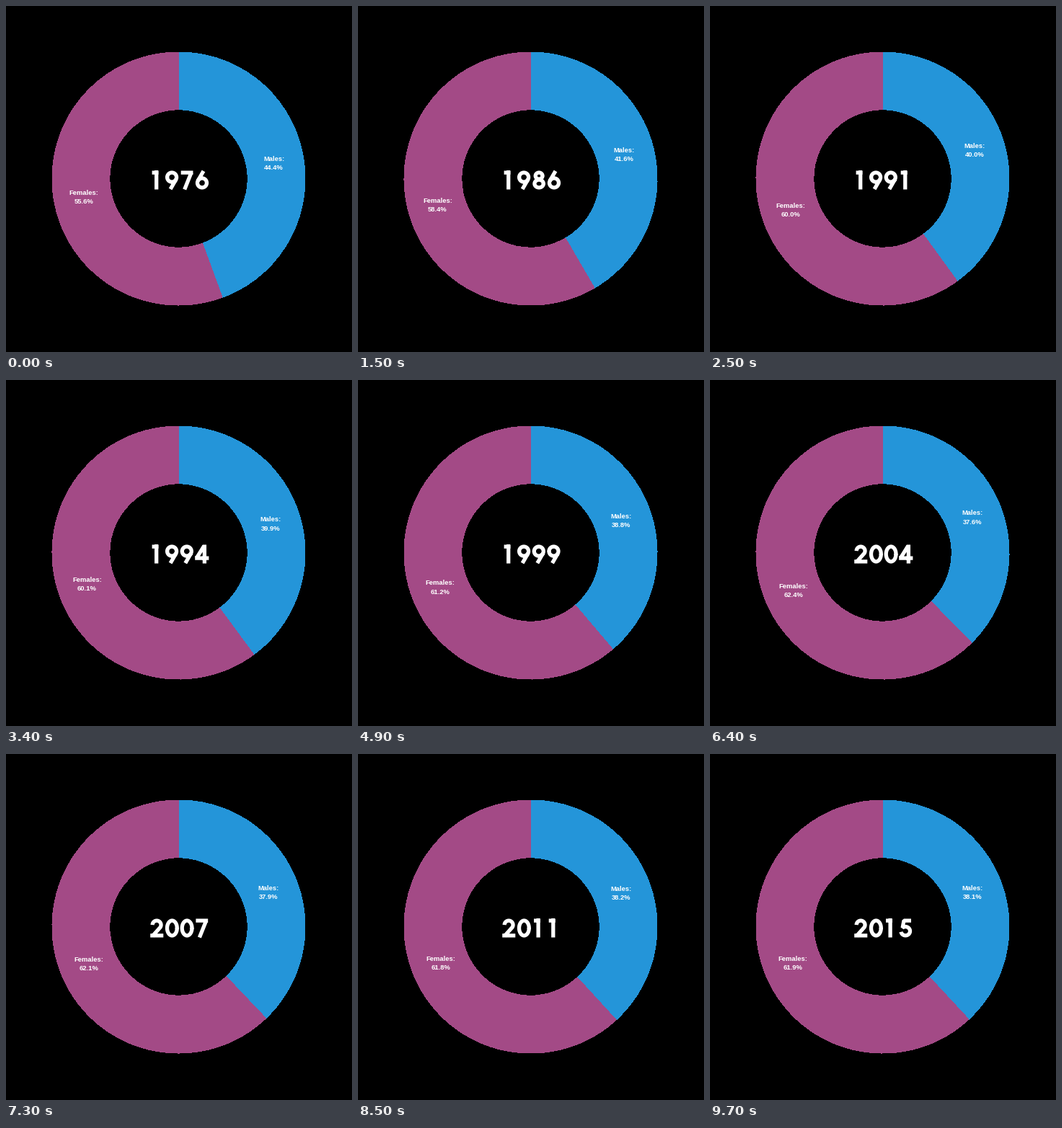
A matplotlib script for the animation above (10000 ms loop, 480 px wide and 480 px high).

```python
import numpy as np
import matplotlib.pyplot as plt
from matplotlib.animation import FuncAnimation
from matplotlib.patches import PathPatch, Wedge
from matplotlib.path import Path

SIZE, DPI, TICK = 480, 100, 100
PT = 72 / DPI
BLUE, PURPLE = "#2495d9", "#a34a86"
CENTER, OUTER, INNER = 239.5, 175.5, 95.7
LABEL_R, LABEL_X, LABEL_Y = 134, 239.7, 241.4

# Digit cell: advance, height and stroke width in pixels
ADVANCE, HEIGHT, STROKE = 20.7, 26, 5.3
YEAR_X, YEAR_Y = 199.3, 228.5

# Share of males at the turning points of the curve
KEY_YEARS = [1976, 1980, 1984, 1986, 1990, 1992, 1994, 1999, 2004, 2011, 2015]
KEY_SHARES = [44.4, 42.8, 42.5, 41.6, 39.7, 40.2, 39.9, 38.8, 37.6, 38.2, 38.1]

# Every second year at first (1978 is skipped), then every year
years = [1976, *range(1980, 1990, 2), *range(1990, 2016)]
schedule = [y for y in years for _ in range(4 if 1980 <= y <= 1986 else 3)]

fig = plt.figure(figsize=(SIZE / DPI, SIZE / DPI), dpi=DPI, facecolor="black")
ax = fig.add_axes([0, 0, 1, 1])
ax.set(xlim=(0, SIZE), ylim=(SIZE, 0))
ax.axis("off")


def arc(x, y, rx, ry=None, start=0, end=365):
    """Points along an ellipse, clockwise on screen from the right."""
    a = np.radians(np.linspace(start, end, 60))
    return np.column_stack([x + rx * np.cos(a), y + (ry or rx) * np.sin(a)])


def line(*points):
    return np.array(points, float)


def make_digits():
    """Strokes of the geometric bold numerals, y pointing down."""
    bar = STROKE / 2
    foot = HEIGHT - bar
    six = [arc(10.6, 16.9, 6.5), line((4.97, 13.65), (12.6, 0.45))]
    return {
        "0": [arc(10.4, 13, 6.9, 10.4)],
        "1": [line((3.3, bar), (12, bar)), line((9.4, 0), (9.4, HEIGHT))],
        "2": [np.vstack([arc(9.8, 8.6, 5.95, start=180, end=395), (4.0, 24)]),
              line((0.9, foot), (19, foot))],
        "3": [arc(10, 7.4, 4.75, start=190, end=450),
              arc(10, 18, 6.3, 5.4, start=270, end=530)],
        "4": [line((14, 0), (14, HEIGHT)), line((13.2, 2), (3, 18.4)),
              line((0.8, 18.6), (20, 18.6))],
        "5": [np.vstack([line((17.6, bar), (7.6, bar)),
                         arc(9.8, 17.2, 6.3, 6.1, start=230, end=530)])],
        "6": six,
        "7": [line((2, bar), (18.8, bar)), line((16.2, 3), (7, HEIGHT))],
        "8": [arc(10.4, 7.1, 4.9, 4.5), arc(10.4, 18, 6.2, 5.4)],
        "9": [(ADVANCE, HEIGHT) - s for s in six],
    }


DIGITS = make_digits()


def year_path(year):
    strokes = [Path(s + (YEAR_X + i * ADVANCE, YEAR_Y))
               for i, d in enumerate(str(year)) for s in DIGITS[d]]
    return Path.make_compound_path(*strokes)


def ring(color):
    wedge = Wedge((CENTER, CENTER), OUTER, -90, 270, width=OUTER - INNER,
                  facecolor=color, edgecolor="none", linewidth=0,
                  antialiased=False)
    return ax.add_patch(wedge)


def write(text=""):
    return ax.text(0, 0, text, color="white", ha="center", va="baseline",
                   family="Liberation Sans", weight="bold", fontsize=9.4 * PT)


def label(name):
    return write(name + ":"), write()


male_ring, female_ring = ring(BLUE), ring(PURPLE)
male_label, female_label = label("Males"), label("Females")
year_patch = ax.add_patch(PathPatch(
    year_path(years[0]), fill=False, edgecolor="white", linewidth=STROKE * PT,
    capstyle="butt", joinstyle="bevel"))


def place(lines, turn, share):
    """Centre a two-line label at a clockwise turn from the top."""
    angle = 2 * np.pi * turn
    x = LABEL_X + LABEL_R * np.sin(angle)
    y = LABEL_Y - LABEL_R * np.cos(angle)
    name, value = lines
    name.set_position((x, y - 3.1))
    value.set_position((x, y + 9))
    value.set_text(f"{share:.1f}%")


def update(tick):
    year = schedule[tick]
    share = round(np.interp(year, KEY_YEARS, KEY_SHARES), 1)
    split = -90 + 3.6 * share
    male_ring.set_theta2(split)
    female_ring.set_theta1(split)
    place(male_label, share / 200, share)
    place(female_label, share / 200 + 0.5, 100 - share)
    year_patch.set_path(year_path(year))
    return male_ring, female_ring, *male_label, *female_label, year_patch


anim = FuncAnimation(fig, update, frames=len(schedule), interval=TICK,
                     repeat=True, repeat_delay=0)
plt.show()
```
